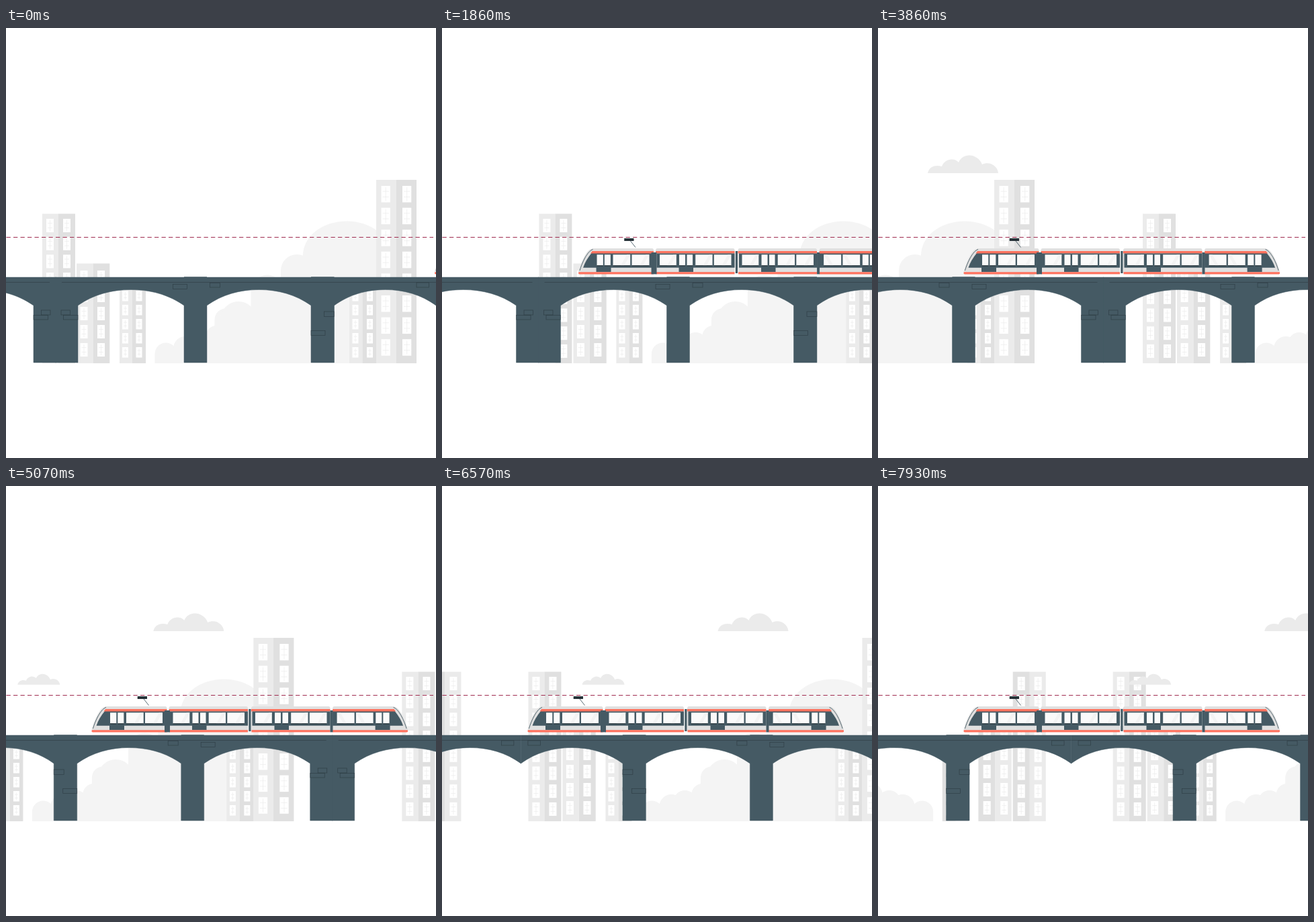
Recreate the animation shown at these times as an HTML page. Size 640 px wide and 640 px high, loop 8000 ms.

```html
<!DOCTYPE html>
<html lang="en">
<head>
<meta charset="utf-8">
<title>Train on a viaduct</title>
<style>
html, body { margin: 0; width: 100%; height: 100%; overflow: hidden; background: #fff; }
svg { display: block; width: 100vw; height: 100vh; }
</style>
</head>
<body>
<svg id="stage" viewBox="0 0 640 640"></svg>
<script>
const LOOP = 8000;
const C = {
  pale: '#f4f4f4', light: '#ebebeb', grey: '#e0e0e0', glass: '#fafafa',
  slate: '#455a64', ink: '#263238', coral: '#ff725e', wire: '#a02c50'
};

const rect = (x1, y1, x2, y2, fill, extra = '') =>
  `<rect x="${x1}" y="${y1}" width="${x2 - x1}" height="${y2 - y1}" fill="${fill}" ${extra}/>`;
const path = (d, fill, extra = '') => `<path d="${d}" fill="${fill}" ${extra}/>`;
const group = (content, transform = '') => `<g transform="${transform}">${content}</g>`;
const mirrored = (content, x) => group(content, `translate(${x}) scale(-1 1)`);
const shifted = (content, x) => group(content, `translate(${x})`);

// --- City ---
function pane(x, y, w, h) {
  const cross = `M${x + w / 2},${y + 2}v${h - 4}M${x + 2},${y + h / 3}h${w - 4}M${x + 2},${y + h * 0.67}h${w - 4}`;
  return rect(x, y, x + w, y + h, '#fff') + path(cross, 'none', `stroke="${C.light}" stroke-width=".7"`);
}

function tower({ x, mid, right, top, columns, w, first, pitch, h }) {
  let out = rect(x, top, mid, 499, C.light) + rect(mid, top, right, 499, C.grey);
  for (let y = first; y + h < 497; y += pitch)
    for (const column of columns) out += pane(column, y, w, h);
  return out;
}

const bushLobes = [
  [238, 485, 16.5], [267, 477, 18], [287, 470, 17], [313, 459, 16],
  [327, 434, 16.5], [346, 434, 27], [389, 392, 24.5], [433, 361, 24]
];
const bush =
  bushLobes.map(([x, y, r]) =>
    path(`M${x - r},499V${y}a${r},${r} 0 0 1 ${2 * r},0H555V499Z`, C.pale)).join('') +
  `<ellipse cx="507" cy="338" rx="65" ry="50.5" fill="${C.pale}"/>` +
  rect(442, 337, 555, 400, C.pale);

const block = bush + [
  { x: 54, mid: 78, right: 103, top: 276.5, columns: [60, 85], w: 11, first: 284, pitch: 26.7, h: 20 },
  { x: 105, mid: 129.5, right: 154.3, top: 350.5, columns: [110.5, 136], w: 11, first: 361, pitch: 27, h: 20 },
  { x: 169, mid: 188, right: 208, top: 380, columns: [173, 193.5], w: 9, first: 391, pitch: 21, h: 15.5 },
  { x: 511, mid: 530.5, right: 551, top: 380, columns: [515.5, 537], w: 9, first: 391, pitch: 21, h: 15.5 },
  { x: 551, mid: 580.5, right: 611, top: 226, columns: [558.5, 590], w: 13.3, first: 235, pitch: 32.6, h: 24.5 }
].map(tower).join('');

const city = block + shifted(block, -718) + mirrored(block, -710);

// --- Clouds ---
const cloud = path('M0,27C2,18 10,14 21,17C25,6 39,3 46,11C52,-4 74,-3 81,14C92,9 104,16 105,27Z', C.light);
const clouds = group(cloud, 'translate(-179 189)') + group(cloud, 'translate(-381 279.5) scale(.6)');

// --- Viaduct: one half, from the centre of the wide pier to the cusp ---
function arch(x1, x2) {
  const w = (x2 - x1) / 2, m = x1 + w, a = w * 0.29, b = w * 0.63;
  return `V413C${x1 + a},397 ${x1 + b},389.5 ${m},389.5S${x2 - a},397 ${x2},413`;
}
const bricks = [
  [8, 420, 21.5, 427], [11.5, 427.5, 33, 434], [174.5, 381.5, 195.5, 388.5],
  [229.5, 379.5, 244.5, 386], [399.5, 422, 414.5, 429.5],
  [380, 450.5, 401, 457.5], [537, 379, 555.5, 386]
];
const inkLine = `stroke="${C.ink}" stroke-opacity=".65" stroke-width=".7"`;
const halfViaduct =
  path(`M-.5,371V498H33${arch(33, 191)}V498H225${arch(225, 380)}V498H414.5${arch(414.5, 566)}V371Z`,
    C.slate, `stroke="${C.slate}" stroke-width=".5"`) +
  rect(191, 370.3, 225, 372, C.slate) + rect(380, 370.3, 414.5, 372, C.slate) +
  path('M9,378.5H566', 'none', inkLine) +
  bricks.map(b => rect(...b, 'none', inkLine)).join('');

const viaduct = shifted(halfViaduct, 74) + mirrored(halfViaduct, 74) + shifted(halfViaduct, -1058);

// --- Train ---
function trainWindow(x1, x2) {
  const w = x2 - x1;
  const shine = w > 15
    ? path(`M${x1 + w * 0.45},353.5l9,-16h5l-9,16z`, '#f3f3f3') : '';
  return rect(x1, 337.3, x2, 353.5, C.glass) + shine + rect(x1, 353.3, x2, 354.5, C.ink);
}
const windows = spans => spans.map(s => trainWindow(...s)).join('');

const endCar =
  path('M127.5,363C131,350 136,339 141,333Q145,328 151,328H237Q239.5,328 239.5,331V364H127.5Z', C.grey) +
  path('M147,335H239.5V356.7H134.5Q138,346 147,335Z', C.slate) +
  path('M149,329.5C141,332 133,349 129.5,361', 'none', `stroke="${C.slate}" stroke-width=".9"`) +
  path('M148,332H239.5V335.5H145.5Z', C.coral) +
  path('M128,363.2H239.5V366.4H129Q126.5,366 128,363.2Z', C.coral) +
  windows([[155, 164.3], [166.3, 175.3], [179, 204.7], [207, 233]]) +
  rect(154, 356, 176, 363, C.slate);

const middleCar =
  path('M242.5,364V331Q242.5,328 245,328H357.5Q360,328 360,331V364Z', C.grey) +
  rect(242.5, 332, 360, 335.5, C.coral) +
  rect(244, 335.5, 360, 356.7, C.slate) +
  rect(243, 363.2, 360, 366.4, C.coral) +
  windows([[248.5, 273.3], [277.5, 286.5], [289, 297.5], [301.7, 327], [329.3, 355]]) +
  rect(277, 356, 298.5, 363, C.slate);

const train =
  endCar + mirrored(endCar, 725.6) + middleCar + shifted(middleCar, 122.5) +
  rect(236, 334, 244, 366.4, C.slate) + rect(361.3, 332, 364.5, 365, C.slate) +
  rect(482.5, 334, 486.5, 366.4, C.slate) +
  path('M205,317L212.5,326.5', 'none', `stroke="${C.slate}" stroke-width=".9"`) +
  rect(195.7, 313, 210, 317, C.ink);

const stage = document.getElementById('stage');
stage.innerHTML =
  `<g id="city">${city}</g><g id="clouds">${clouds}</g>` +
  path('M.5,311.5H636', 'none', `stroke="${C.wire}" stroke-width="1.2" stroke-dasharray="6.3 4.2"`) +
  `<g id="train">${train}</g><g id="viaduct">${viaduct}</g>`;

const layer = Object.fromEntries(
  ['city', 'clouds', 'train', 'viaduct'].map(id => [id, document.getElementById(id)]));
const slide = (name, x) => layer[name].setAttribute('transform', `translate(${x.toFixed(2)})`);
const ease = u => { u = Math.min(1, u); return u * u * (3 - 2 * u); };

function draw(now) {
  const t = now % LOOP;
  const travel = 1358 * ease(t / 11820);
  slide('city', travel);
  slide('clouds', travel * 0.744);
  slide('viaduct', travel * 0.769);
  slide('train', 510.5 * (1 - ease(t / 2457)));
  requestAnimationFrame(draw);
}
draw(performance.now());
</script>
</body>
</html>
```
